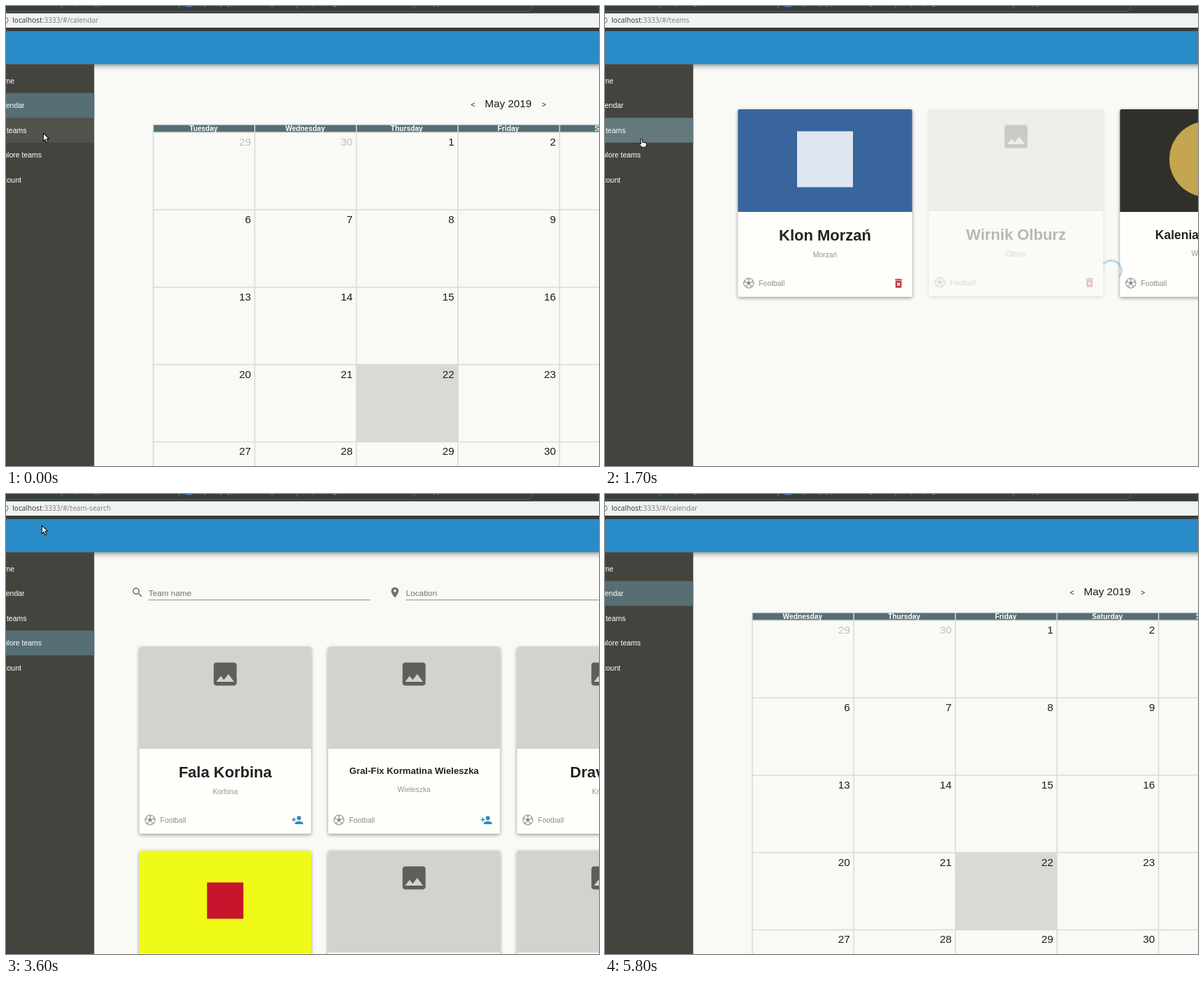
An HTML page with a canvas for the animation above (6.2 s loop, 849 by 659 pixels).

```html
<!DOCTYPE html>
<html lang="en">
<head>
<meta charset="utf-8">
<title>Team calendar</title>
<style>
html, body { margin: 0; width: 100%; height: 100%; overflow: hidden; background: #f9faf5; }
canvas { display: block; width: 849px; height: 659px; }
</style>
</head>
<body>
<canvas id="stage" width="849" height="659"></canvas>
<script>
const W = 849, H = 659, LOOP = 6200, STEP = 100;
const SANS = '"Liberation Sans", Arial, sans-serif';
const UI = '"Open Sans", "Noto Sans", sans-serif';
const BLUE = '#298cc8', SLATE = '#566e74', LINE = '#d9dad5';

const main = document.getElementById('stage').getContext('2d');
const layerCanvas = document.createElement('canvas');
layerCanvas.width = W;
layerCanvas.height = H;
const layer = layerCanvas.getContext('2d');
let g = main;

const clamp = v => Math.max(0, Math.min(1, v));
const lerp = (a, b, k) => a + (b - a) * k;
const easeOut = u => 1 - (1 - clamp(u)) ** 3;

function rect(x, y, w, h, fill) {
  g.fillStyle = fill;
  g.fillRect(x, y, w, h);
}

function text(str, x, y, size, fill, align = 'left', weight = '', family = SANS) {
  g.font = `${weight} ${size}px ${family}`;
  g.textAlign = align;
  g.fillStyle = fill;
  g.fillText(str, x, y);
}

function box(x, y, w, h, r, fill) {
  g.beginPath();
  g.roundRect(x, y, w, h, r);
  g.fillStyle = fill;
  g.fill();
}

function disc(x, y, r, fill) {
  g.beginPath();
  g.arc(x, y, r, 0, 7);
  g.fillStyle = fill;
  g.fill();
}

function shadow(color, blur, dy) {
  g.shadowColor = color;
  g.shadowBlur = blur;
  g.shadowOffsetY = dy;
}

// Draws on a separate layer, then lays it down with one opacity.
function group(alpha, draw) {
  if (alpha <= 0) return;
  layer.clearRect(0, 0, W, H);
  g = layer;
  draw();
  g = main;
  g.globalAlpha = alpha;
  g.drawImage(layerCanvas, 0, 0);
  g.globalAlpha = 1;
}

// Icons on a 24-unit grid.
const ICONS = {
  photo: 'M21 19V5c0-1.1-.9-2-2-2H5c-1.1 0-2 .9-2 2v14c0 1.1.9 2 2 2h14c1.1 0 2-.9 2-2zM8.5 13.5l2.5 3L14.5 12l4.5 6H5z',
  trash: 'M6 19c0 1.1.9 2 2 2h8c1.1 0 2-.9 2-2V7H6zM8.5 11.9l1.4-1.4 2.1 2.1 2.1-2.1 1.4 1.4-2.1 2.1 2.1 2.1-1.4 1.4-2.1-2.1-2.1 2.1-1.4-1.4 2.1-2.1zM15.5 4l-1-1h-5l-1 1H5v2h14V4z',
  join: 'M15 12a4 4 0 1 0 0-8 4 4 0 0 0 0 8zM6 10V7H4v3H1v2h3v3h2v-3h3v-2zM15 14c-2.7 0-8 1.3-8 4v2h16v-2c0-2.7-5.3-4-8-4z',
  search: 'M15.5 14h-.8l-.3-.3A6.5 6.5 0 1 0 13.7 14.4l.3.3v.8l5 5 1.5-1.5zM9.5 14a4.5 4.5 0 1 1 0-9 4.5 4.5 0 0 1 0 9z',
  pin: 'M12 2a7 7 0 0 0-7 7c0 5.2 7 13 7 13s7-7.8 7-13a7 7 0 0 0-7-7zM12 11.5a2.5 2.5 0 1 1 0-5 2.5 2.5 0 0 1 0 5z'
};
for (const k in ICONS) ICONS[k] = new Path2D(ICONS[k]);
const HAND = new Path2D('M3.2 7V1.7a1.2 1.2 0 0 1 2.4 0V5l4.6 .9q1.5.4 1.3 2L10.6 12.2H4.6L.8 8.4Q.4 6.8 1.8 6.9L3.2 8z');
const ARROW = new Path2D('M0 0V11.6L2.6 9.2 4.5 13.6 6.5 12.7 4.6 8.4H8.2z');

function icon(name, cx, cy, scale, fill) {
  g.save();
  g.translate(cx - 12 * scale, cy - 12 * scale);
  g.scale(scale, scale);
  g.fillStyle = fill;
  g.fill(ICONS[name], 'evenodd');
  g.restore();
}

function ball(cx, cy) {
  g.strokeStyle = g.fillStyle = '#8d8d89';
  g.lineWidth = 1;
  g.beginPath();
  g.arc(cx, cy, 7.2, 0, 7);
  g.stroke();
  const at = (r, i) => [cx + r * Math.sin(i * Math.PI * .4), cy - r * Math.cos(i * Math.PI * .4)];
  g.beginPath();
  for (let i = 0; i < 5; i++) g.lineTo(...at(2.9, i));
  g.fill();
  g.beginPath();
  for (let i = 0; i < 5; i++) {
    g.moveTo(...at(2.9, i));
    g.lineTo(...at(5.4, i));
    g.moveTo(...at(7, i - .3));
    g.lineTo(...at(5.2, i));
    g.lineTo(...at(7, i + .3));
  }
  g.stroke();
}

const TEAMS = [
  { name: 'Klon Morzań', town: 'Morzań', size: 22, back: '#38659b', mark: '#dfe7f1', side: 80 },
  { name: 'Wirnik Olburz', town: 'Olburz', size: 22, alpha: .3 },
  { name: 'Kalenia Wodzisko', town: 'Wodzisko', size: 17.5, back: '#302f2a', mark: '#c4a650', side: 108, round: true }
];
const FOUND = [
  { name: 'Fala Korbina', town: 'Korbina', size: 22 },
  { name: 'Gral-Fix Kormatina Wieleszka', town: 'Wieleszka', size: 13.2 },
  { name: 'Dravonia', town: 'Krelów', size: 22 },
  { back: '#f0fa18', mark: '#c8142c', side: 52 },
  {},
  {}
];

function card(team, cx, top, w, scale, action, tint) {
  const imgH = team.back ? 147 : 146, h = imgH + 121.7;
  const left = cx - w / 2, cy = top + h / 2, base = top + imgH;
  g.save();
  g.translate(cx, cy);
  g.scale(scale, scale);
  g.translate(-cx, -cy);
  shadow('rgba(0,0,0,.42)', 5, 1.5);
  box(left, top, w, h, 2.5, '#fefefb');
  shadow('transparent', 0, 0);
  box(left, top, w, imgH, [2.5, 2.5, 0, 0], team.back || '#d2d3ce');
  if (!team.mark) icon('photo', cx, top + 39, 1.83, '#5e5f5a');
  else if (team.round) disc(cx, top + 71.5, team.side / 2, team.mark);
  else rect(cx - team.side / 2, top + 71.5 - team.side / 2, team.side, team.side, team.mark);
  if (team.name) {
    text(team.name, cx, base + 28 + .6 * team.size, team.size, '#232321', 'center', 'bold');
    text(team.town, cx, base + 58 + .3 * team.size, 10.4, '#969692', 'center');
    ball(left + 15.5, base + 102);
    text('Football', left + 30, base + 105.8, 10.4, '#8d8d89');
    icon(action, left + w - 19.5, base + 102.2, .73, tint);
  }
  g.restore();
}

function spinner(cx, cy, deg, alpha) {
  if (alpha <= 0) return;
  const a = deg * Math.PI / 180;
  g.globalAlpha = alpha;
  g.strokeStyle = BLUE;
  g.lineWidth = 3;
  g.beginPath();
  g.arc(cx, cy, 14.3, a, a + Math.PI);
  g.stroke();
  g.globalAlpha = 1;
}

const DAYS = ['Tuesday', 'Wednesday', 'Thursday', 'Friday', 'Saturday', 'Sunday'];

function calendar(shift) {
  const x0 = 210.7, y0 = 181, cw = 145.45, ch = 110.85;
  text('<', 668.5, 145, 10.5, '#1c1c1a', 'center');
  text('May 2019', 719, 145.3, 15.3, '#1c1c1a', 'center');
  text('>', 770, 145, 10.5, '#1c1c1a', 'center');
  rect(x0, 170, W, 11, SLATE);
  rect(x0 + 2 * cw, y0 + 3 * ch, cw, ch, LINE);
  for (let r = 0; r < 5; r++) {
    rect(x0 - .7, y0 + r * ch - .7, W, 1.5, LINE);
    for (let c = 0; c < 4; c++) {
      const n = r * 7 + c - 1;
      text(n < 1 ? n + 30 : n, x0 + (c + 1) * cw - 5.3, y0 + r * ch + 19, 15.3,
        n < 1 ? '#c0c1bc' : '#1c1c1a', 'right');
    }
  }
  rect(x0 - .7, 169.6, W, 1, LINE);
  for (let c = 0; c < 5; c++) {
    rect(x0 + c * cw - .7, 170, 1.5, H, LINE);
    text(DAYS[c + shift], x0 + (c + .5) * cw - .6, 178.8, 10.25, '#fff', 'center', 'bold');
  }
}

function field(name, label, x, end) {
  icon(name, x - 15.8, 141, .76, '#70706c');
  text(label, x, 146.2, 11.8, '#70706c');
  rect(x, 151.3, end - x, 1, '#8a8a86');
}

function teamsPage(t, p) {
  TEAMS.forEach((team, i) => group(p * (team.alpha || 1), () =>
    card(team, 315 + i * 273.5, 148, 249.5, .5 + p / 2, 'trash', '#c2383c')));
  spinner(725, 379, -97 + .628 * (t - 1200), clamp(1 - (t - 1400) / 430));
}

function searchPage(t, p) {
  const loaded = t >= 2700, dx = loaded ? 0 : 3.6;
  group(clamp(.6 + (t - 2400) / 1700), () => {
    field('search', 'Team name', 204, 521.5 + dx);
    field('pin', 'Location', 572.6 + dx, W);
  });
  group(p, () => FOUND.forEach((team, i) =>
    card(team, 313.8 + i % 3 * 270.4, i < 3 ? 219 : 511, 246, .5 + p / 2, 'join', BLUE)));
  spinner(loaded ? 718.5 : 725, loaded ? 495 : 379, 103 + .703 * (t - 2400), clamp(1 - (t - 2700) / 430));
}

function browser(t) {
  rect(0, 0, W, 36, '#363e3b');
  g.strokeStyle = '#59615e';
  g.lineWidth = 1;
  g.beginPath();
  g.moveTo(0, 7.5);
  g.lineTo(746, 7.5);
  g.quadraticCurveTo(753, 7, 753, 0);
  g.stroke();
  for (let i = 0; i < 4; i++) rect(79 + i * 168.4, 0, 1, 4, '#6a726f');
  const tabs = [[-20, 'notes'], [100, 'prototype'], [275, 'My daily types of the day'], [430, 'Open pages'], [600, 'Copy'] ];
  for (const [x, s] of tabs) text(s, x, -.6, 9.5, '#b9bfbb', 'left', '', UI);
  rect(257, 0, 10, 1.2, '#4d7fd6');
  rect(0, 10.5, W, 20.5, '#f1f3f0');
  g.strokeStyle = '#6b6b69';
  g.beginPath();
  g.arc(-1, 20.5, 4, 0, 7);
  g.stroke();
  const path = t < 700 || t >= 4700 ? 'calendar' : t < 2400 ? 'teams' : 'team-search';
  text('localhost', 9.3, 24.2, 10.15, '#2f3331', 'left', '', UI);
  const w = g.measureText('localhost').width;
  text(':3333/#/' + path, 9.3 + w, 24.2, 10.15, '#7b7e7c', 'left', '', UI);
}

const MENU = ['Home', 'Calendar', 'My teams', 'Explore teams', 'Account'];
const ROW_TOP = 89.2, ROW_H = 35.5;
const enter = (t, s) => t < s ? 0 : clamp(.65 + (t - s) / 200);
const leave = (t, s) => t < s ? 1 : 1 - clamp(.55 + (t - s) / 200);

function sidebar(t, hover) {
  const active = [
    0,
    t < 4800 ? leave(t, 1000) : enter(t, 4800),
    enter(t, 1000) * leave(t, 2400),
    enter(t, 2400) * leave(t, 4800),
    0
  ];
  rect(0, 83.3, 126.3, H, '#44443f');
  MENU.forEach((label, i) => {
    const y = ROW_TOP + i * ROW_H;
    g.globalAlpha = active[i];
    rect(0, y, 126.3, ROW_H, SLATE);
    g.globalAlpha = 1;
    if (i === hover) rect(0, y, 126.3, ROW_H, 'rgba(255,255,255,.075)');
    text(label, -16, y + 21.7, 10.5, '#fff');
  });
}

// time, x, y
const PATH = [
  [0, 53.5, 182], [400, 53.5, 182], [500, 50.5, 182], [700, 50, 181], [1600, 50, 181],
  [1700, 48, 190], [2200, 48, 214], [3000, 48, 214], [3700, 52, 17], [3900, 52, 15.5],
  [4100, 52, 15.5], [4200, 60, 45], [4300, 63, 95], [4400, 50, 138], [4500, 39, 153],
  [5200, 39, 153], [5500, 30, 16], [5600, -40, -40], [LOOP, -40, -40]
];

function pointer(t) {
  const i = PATH.findIndex(k => k[0] > t);
  const a = PATH[i - 1], b = PATH[i], k = (t - a[0]) / (b[0] - a[0]);
  return [lerp(a[1], b[1], k), lerp(a[2], b[2], k)];
}

function cursor(x, y, shape) {
  g.save();
  g.translate(x, y);
  g.lineJoin = 'round';
  g.lineWidth = 1.1;
  g.strokeStyle = '#111';
  g.fillStyle = '#fff';
  g.fill(shape);
  g.stroke(shape);
  g.restore();
}

function draw(t) {
  const searching = t >= 2400 && t < 4800;
  const showsTeams = t >= 1000 && t < 2400;
  const p = searching ? easeOut((t - 2690) / 620) : showsTeams ? easeOut((t - 1070) / 620) : 1;
  const pale = 3 * Math.min(1, 2 * (1 - p));
  rect(0, 0, W, H, `rgb(${249 + pale},${250 + pale},${245 + pale})`);

  if (searching) searchPage(t, p);
  else if (showsTeams) teamsPage(t, p);
  else if (t < 1000) calendar(0);
  else group(t < 5200 ? Math.min(.92, .5 + (t - 4800) / 450) : clamp(.93 + (t - 5200) / 6000), () => calendar(1));

  shadow('rgba(0,0,0,.5)', 8, 2);
  rect(-20, 36, W + 40, 47.3, BLUE);
  shadow('transparent', 0, 0);
  browser(t);

  const [x, y] = pointer(t);
  const row = x < 0 ? -1 : Math.floor((y + 1 - ROW_TOP) / ROW_H);
  sidebar(t, row);
  const onMenu = row >= 0 && row < MENU.length;
  cursor(x, y, t >= 500 && onMenu ? HAND : ARROW);
}

let shown = -1;
const start = performance.now();
function frame(now) {
  const t = Math.floor(Math.max(0, now - start) % LOOP / STEP) * STEP;
  if (t !== shown) draw(shown = t);
  requestAnimationFrame(frame);
}
frame(start);
</script>
</body>
</html>
```
